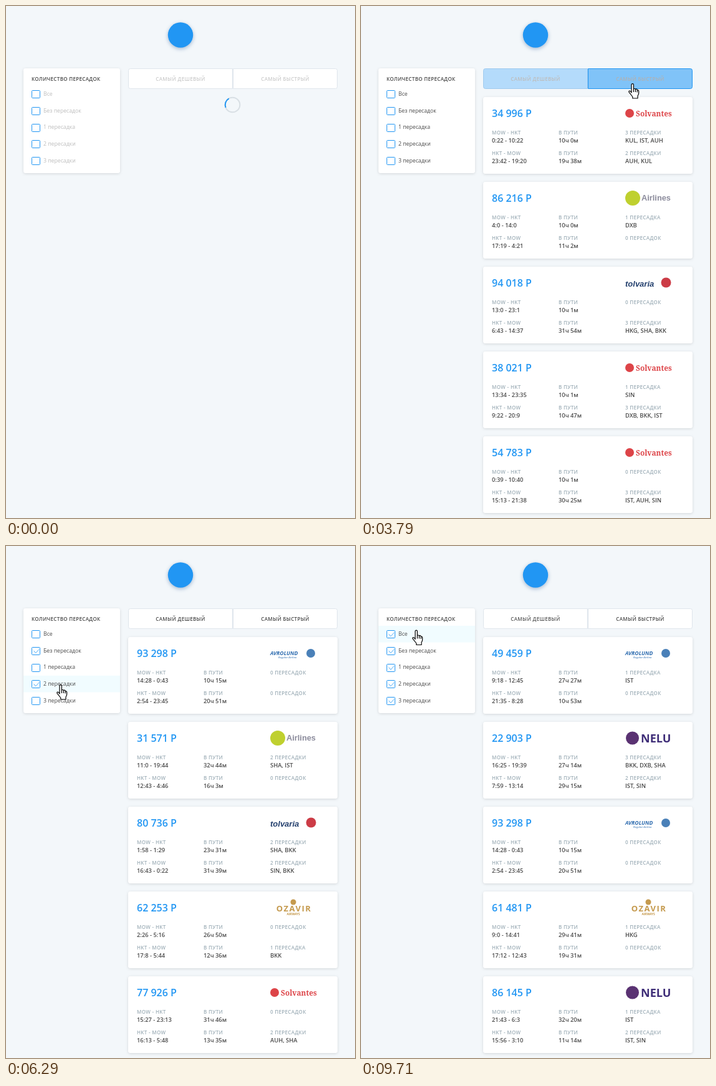
An HTML page that plays this animation: 560 by 821 pixels, repeating every 9.81 s.

```html
<!DOCTYPE html>
<html lang="ru">
<head>
<meta charset="utf-8">
<title>Поиск билетов</title>
<style>
html, body { margin: 0; width: 100%; height: 100%; overflow: hidden; background: #f3f7fa; }
svg { display: block; width: 560px; height: 821px; font-family: "Open Sans", sans-serif; }
text { white-space: pre; }
.box { fill: #fff; filter: drop-shadow(0 1.3px 2.2px rgba(0, 0, 0, .13)); }
.cap { font-size: 8px; font-weight: 600; letter-spacing: .33px; }
.grey { fill: #a0b0b9; }
.val { font-size: 9.37px; font-weight: 600; fill: #4a4a4a; }
.price { font-size: 16px; font-weight: 600; fill: #2196f3; }
.row { font-size: 8.7px; }
.mid { text-anchor: middle; }
</style>
</head>
<body>
<svg id="stage" viewBox="0 0 560 821" xmlns="http://www.w3.org/2000/svg"></svg>
<script>
const LOOP = 9810, FADE = 700, LOAD = 1300;
const BLUE = [33, 150, 243], WHITE = [255, 255, 255], DARK = [74, 74, 74];
const LINE = [223, 229, 236], PALE = [204, 204, 204];

// price, carrier, then for each leg: departure, duration, stops
const TICKETS = {};
`49459 avr 9:18 27:27 IST 21:35 10:53 -
22903 nel 16:25 27:14 BKK,DXB,SHA 7:59 29:15 IST,SIN
93298 avr 14:28 10:15 - 2:54 20:51 -
61481 oza 9:0 29:41 HKG 17:12 19:31 -
86145 nel 21:43 32:20 IST 15:56 11:14 IST,SIN
15004 nel 17:38 29:4 - 17:25 24:25 SHA
15013 nel 4:40 11:6 BKK,AUH 13:43 16:18 SHA,DXB
15016 oza 8:46 19:4 IST,DXB,KUL 12:10 20:11 SIN,DXB,SHA
15035 nel 15:39 15:46 DXB,HKG 14:43 32:54 -
15036 nel 22:10 31:28 - 14:14 30:48 -
15056 air 0:19 26:23 KUL,DXB 14:27 21:27 SHA
34996 sol 0:22 10:0 KUL,IST,AUH 23:42 19:38 AUH,KUL
86216 air 4:0 10:0 DXB 17:19 11:2 -
94018 tol 13:0 10:1 - 6:43 31:54 HKG,SHA,BKK
38021 sol 13:34 10:1 SIN 9:22 10:47 DXB,BKK,IST
54783 sol 0:39 10:1 - 15:13 30:25 IST,AUH,SIN
31571 air 11:0 32:44 SHA,IST 12:43 16:3 -
80736 tol 1:58 23:31 SHA,BKK 16:43 31:39 SIN,BKK
62253 oza 2:26 26:50 - 17:8 12:36 BKK
77926 sol 15:27 31:46 - 16:13 13:35 AUH,SHA`
  .split('\n').forEach(s => { const f = s.split(' '); TICKETS[f[0]] = f; });

// start time and tickets on show
const LISTS = [
  [LOAD, '49459 22903 93298 61481 86145'],
  [2550, '15004 15013 15016 15035 15036'],
  [3560, '34996 86216 94018 38021 54783'],
  [4800, '93298 62253 77926 94018 15036'],
  [5870, '93298 31571 80736 62253 77926'],
  [7660, '15004 15013 15035 15036 15056'],
  [9060, '49459 22903 93298 61481 86145']
];
const ROWS = ['Все', 'Без пересадок', '1 пересадка', '2 пересадки', '3 пересадки'];
const TICKS = [9060, 4800, 9060, 5870, 9060];
const TABS = [
  { x: 196, name: 'САМЫЙ ДЕШЕВЫЙ', on: [[2540, 3560], [7660, 9060]], hover: [[2070, 2950], [7330, 8180]] },
  { x: 364, name: 'САМЫЙ БЫСТРЫЙ', on: [[3560, 4800]], hover: [[3060, 4020]] }
];
// time and pointer tip
const PATH = [
  [480, 13, 1], [1010, 61, 36], [1520, 247, 32], [2020, 258, 117], [2150, 258, 114],
  [2640, 258, 114], [3060, 435.5, 124], [3900, 435.5, 124], [4480, 94.5, 165],
  [5200, 94.5, 165], [5550, 88, 220], [5640, 87.5, 222], [6620, 87.5, 222],
  [7400, 241.5, 124], [8080, 241.5, 124], [8600, 88, 133], [8750, 88.5, 134.5]
];

const circle = (x, y, r, fill) => `<circle cx="${x}" cy="${y}" r="${r}" fill="${fill}"/>`;
const text = (x, y, cls, s, more = '') => `<text x="${x}" y="${y}" class="${cls}" ${more}>${s}</text>`;
const word = (x, y, size, fill, s, style = '') =>
  text(x, y, '', s, `font-size="${size}" fill="${fill}" font-weight="700" style="${style}"`);

const SANS = 'font-family:"Liberation Sans",sans-serif'.replace(/"/g, "'");
const SERIF = "font-family:'Noto Serif',serif";
const LOGOS = {
  avr: y => word(424, y + 29, 8.6, '#2f6db0', 'AVROLUND', 'font-style:italic') +
    word(437, y + 34, 4.2, '#6d9ac8', 'Regular Airline', 'font-style:italic') +
    circle(489, y + 26, 7, '#4a80b8'),
  nel: y => circle(435.5, y + 26, 10.5, '#5a3272') + word(449, y + 32.5, 18, '#3f2e78', 'NELU'),
  oza: y => circle(461, y + 17, 4.5, '#c59a4e') +
    word(462, y + 31.5, 13, '#c59a4e', 'OZAVIR', 'letter-spacing:1.5px;text-anchor:middle') +
    word(461, y + 38, 4.8, '#c59a4e', 'AIRWAYS', 'text-anchor:middle'),
  sol: y => circle(431, y + 26, 7, '#dd4448') + word(441, y + 31, 11.8, '#dd4448', 'Solvantes', SERIF),
  air: y => circle(436, y + 26, 12, '#bfd02f') + word(450, y + 30, 12.8, '#8b8b9c', 'Airlines', SANS),
  tol: y => word(424, y + 31.5, 13, '#24406e', 'tolvaria', SANS + ';font-style:italic') +
    circle(489.5, y + 25.5, 8, '#cc3c46')
};

function arrival(from, span) {
  const [a, b] = [from, span].map(s => s.split(':').map(Number));
  const m = (a[0] + b[0]) * 60 + a[1] + b[1];
  return `${Math.floor(m / 60) % 24}:${m % 60}`;
}

function leg(y, route, from, span, stops) {
  const codes = stops === '-' ? [] : stops.split(',');
  const noun = ['ПЕРЕСАДОК', 'ПЕРЕСАДКА', 'ПЕРЕСАДКИ', 'ПЕРЕСАДКИ'][codes.length];
  const [h, m] = span.split(':');
  return [
    [210, route, `${from} - ${arrival(from, span)}`],
    [317, 'В ПУТИ', `${h}ч ${m}м`],
    [424, `${codes.length} ${noun}`, codes.join(', ')]
  ].map(([x, a, b]) => text(x, y, 'cap grey', a) + text(x, y + 13, 'val', b)).join('');
}

function card(id, i) {
  const y = 146 + 136 * i, [price, logo, ...d] = TICKETS[id];
  return `<rect class="box" x="196" y="${y}" width="336" height="123" rx="3.4"/>` +
    text(210, y + 32, 'price', `${price.slice(0, 2)} ${price.slice(2)} Р`) + LOGOS[logo](y) +
    leg(y + 60, 'MOW - HKT', ...d.slice(0, 3)) + leg(y + 93, 'HKT - MOW', ...d.slice(3));
}

const rowY = i => 141.2 + 26.65 * i;

const filterRow = (s, i) => {
  const y = rowY(i);
  return `<rect class="glow" x="28" y="${y - 13.3}" width="155" height="26.65" fill="#f1fcff"/>
    <rect x="41.5" y="${Math.round(y - 6) + .5}" width="13" height="12" rx="1" fill="#fff" stroke="#2196f3"/>
    <path class="tick" d="M44.5 ${y}l3.2 3.8 5.3-6" fill="none" stroke="#2196f3" stroke-width=".8"/>` +
    text(60, y + 2.8, 'row', s);
};

// left tab rounds its left corners, right tab its right ones
const tabShape = i => i
  ? 'M364.5 100.5H528.5Q531.5 100.5 531.5 103.5V129.5Q531.5 132.5 528.5 132.5H364.5Z'
  : 'M363.5 100.5H199.5Q196.5 100.5 196.5 103.5V129.5Q196.5 132.5 199.5 132.5H363.5Z';

const stage = document.getElementById('stage');
stage.innerHTML = `
  <rect width="560" height="821" fill="#f3f7fa"/>
  <circle cx="280" cy="46.5" r="20.2" fill="#2196f3" style="filter:drop-shadow(0 2.7px 3px rgba(40,90,150,.4))"/>
  <rect class="box" x="28" y="100" width="155" height="168" rx="3.4"/>
  ${text(41, 120, 'cap', 'КОЛИЧЕСТВО ПЕРЕСАДОК', 'fill="#4a4a4a"')}
  ${ROWS.map(filterRow).join('')}
  ${TABS.map((b, i) => `<path class="tab" d="${tabShape(i)}"/>` + text(b.x + 84, 120, 'cap mid label', b.name)).join('')}
  <g id="spin" fill="none" stroke-width="2">
    <circle cx="363.5" cy="158.5" r="11.8" stroke="#d8dfe4"/>
    <path d="M352.6 163A11.8 11.8 0 0 1 357.6 148.3" stroke="#2196f3"/>
  </g>
  ${LISTS.map(l => `<g class="list">${l[1].split(' ').map(card).join('')}</g>`).join('')}
  <g id="pointer" fill="#fff" stroke="#000" stroke-linejoin="round">
    <path id="arrow" d="M.5 .5V16.5L4.2 13.2L6.7 19L9.3 17.9L6.9 12.2H11.8Z"/>
    <path id="hand" transform="translate(-6.5 0)" stroke-width="1.2" d="M5 15V2.5Q5 .7 6.7 .7T8.4 2.5V9.5Q8.6 8.4 10 8.5T11.4 10Q11.6 9 13 9.2T14.2 11Q16.4 10.4 16.6 12.6V16Q16.5 18 15 20V24H6.8V21.5L1 14.2Q.4 12.2 2 12Q3.4 12 5 15ZM8.4 9.5V14M11.4 10V14M14.2 11V14.5"/>
  </g>`;

const all = s => [...stage.querySelectorAll(s)];
const byId = id => document.getElementById(id);
const tabs = all('.tab'), labels = all('.label'), rows = all('.row');
const glows = all('.glow'), ticks = all('.tick'), lists = all('.list');

const show = (el, on) => el.setAttribute('display', on ? 'inline' : 'none');
const clamp = x => Math.min(1, Math.max(0, x));
const mix = (a, b, k) => a.map((v, i) => v + (b[i] - v) * k);
const rgb = c => `rgb(${c.map(Math.round)})`;

// the CSS "ease" curve
function ease(x) {
  if (x <= 0 || x >= 1) return clamp(x);
  let lo = 0, hi = 1;
  for (let i = 0; i < 20; i++) {
    const s = (lo + hi) / 2;
    if (.75 * s * (1 - s) + s ** 3 < x) lo = s; else hi = s;
  }
  return .3 * (1 - lo) ** 2 * lo + 3 * (1 - lo) * lo * lo + lo ** 3;
}
const fade = (t, from, span = FADE) => ease((t - from) / span);
const level = (t, spans, inTime, outTime) =>
  spans.reduce((sum, [a, b]) => sum + fade(t, a, inTime) * (1 - fade(t, b, outTime)), 0);

function pointerAt(t) {
  const n = PATH.findIndex(p => p[0] > t);
  if (n < 0) return PATH[PATH.length - 1].slice(1);
  if (!n) return null;
  const a = PATH[n - 1], b = PATH[n], k = (t - a[0]) / (b[0] - a[0]);
  const s = k * k * (3 - 2 * k);
  return [a[1] + (b[1] - a[1]) * s, a[2] + (b[2] - a[2]) * s];
}

function draw(t) {
  const ready = t >= LOAD, p = pointerAt(t);

  show(byId('spin'), !ready);
  byId('spin').setAttribute('transform', `rotate(${t * .36} 363.5 158.5)`);
  lists.forEach((g, i) => show(g, t >= LISTS[i][0] && !(i + 1 < LISTS.length && t >= LISTS[i + 1][0])));

  const base = mix(PALE, DARK, fade(t, LOAD));
  TABS.forEach((b, i) => {
    const on = level(t, b.on, FADE, 600), hot = level(t, b.hover, 330, 330);
    tabs[i].setAttribute('fill', rgb(mix(WHITE, BLUE, on)));
    tabs[i].setAttribute('stroke', rgb(mix(LINE, BLUE, Math.max(on, hot))));
    labels[i].setAttribute('fill', rgb(mix(base, WHITE, level(t, b.on, FADE, 1000))));
  });

  const row = p && p[0] > 28 && p[0] < 183 ? Math.floor((p[1] - rowY(0) + 13.3) / 26.65) : -1;
  const onTab = p && p[0] > 196 && p[0] < 532 && p[1] > 100 && p[1] < 133;
  const onRow = ready && row >= 0 && row < 5;
  ROWS.forEach((_, i) => {
    show(glows[i], onRow && row === i);
    ticks[i].setAttribute('opacity', fade(t, TICKS[i], 300));
    rows[i].setAttribute('fill', ready ? '#4a4a4a' : '#bdbdbd');
  });

  show(byId('pointer'), p);
  if (p) byId('pointer').setAttribute('transform', `translate(${p[0]} ${p[1]})`);
  show(byId('hand'), onRow || onTab);
  show(byId('arrow'), !(onRow || onTab));
}

const start = performance.now();
function tick() {
  draw((performance.now() - start) % LOOP);
  requestAnimationFrame(tick);
}
tick();
</script>
</body>
</html>
```
